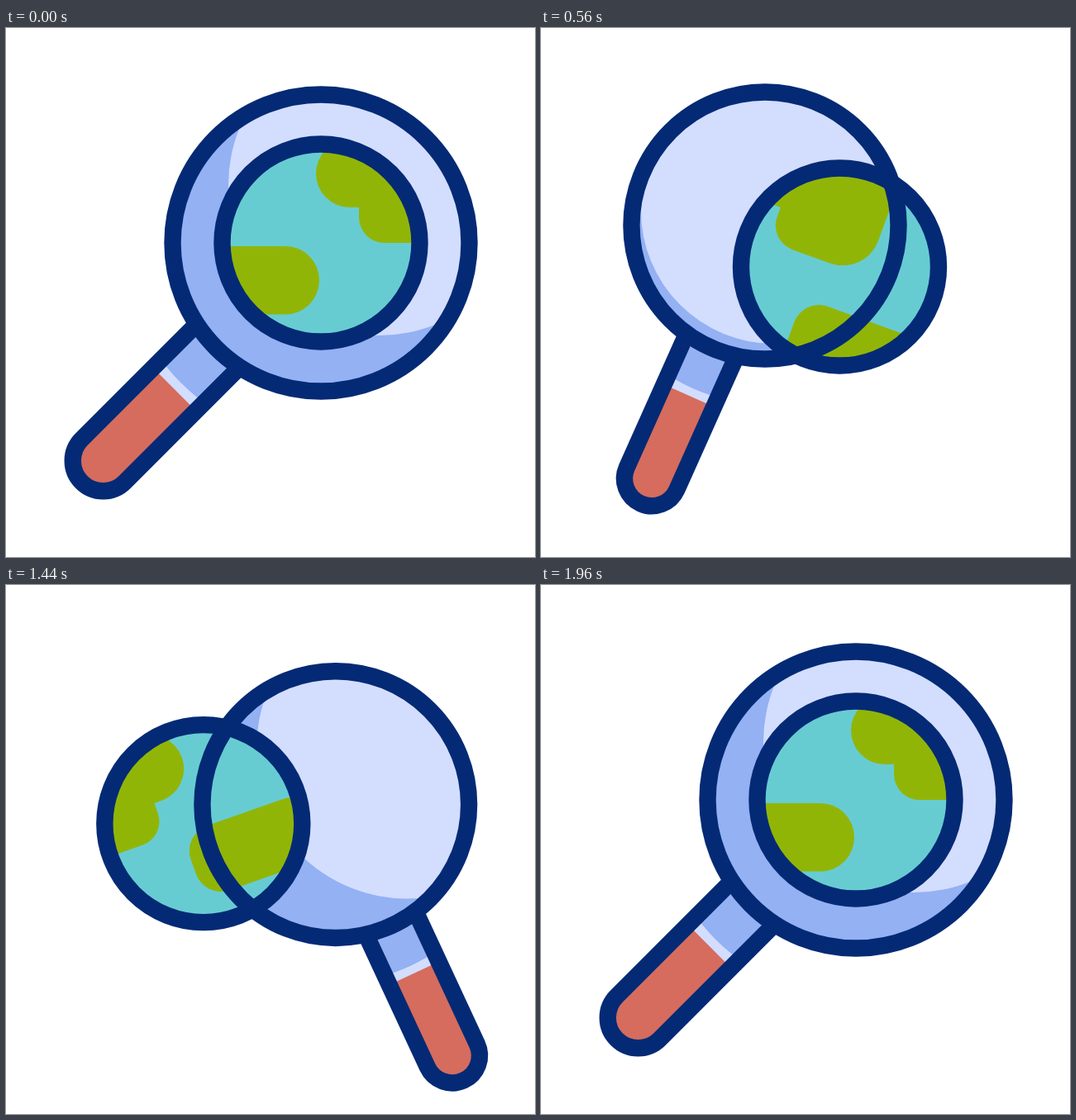
These frames come from a looping animation (640 px wide and 640 px high, 2000 ms). An HTML page with a canvas:

```html
<!DOCTYPE html>
<html lang="en">
<head>
<meta charset="utf-8">
<title>Magnifier and globe</title>
<style>
  html, body { margin: 0; width: 100%; height: 100%; overflow: hidden; background: #fff; }
  canvas { display: block; width: 100vmin; height: 100vmin; }
</style>
</head>
<body>
<canvas id="stage" width="640" height="640"></canvas>
<script>
const ctx = document.getElementById('stage').getContext('2d');
const LOOP = 2000, STEP = 40;
const NAVY = '#042a75', LIGHT = '#d3ddfe', BLUE = '#93b1f3';
const TEAL = '#67ccd2', GREEN = '#91b507', RED = '#d56c5e';

// Cubic Bézier easing, solved by bisection.
function bezier(x1, y1, x2, y2) {
  const at = (a, b, s) => 3 * a * s * (1 - s) ** 2 + 3 * b * s * s * (1 - s) + s ** 3;
  return u => {
    if (u <= 0) return 0;
    if (u >= 1) return 1;
    let lo = 0, hi = 1;
    for (let i = 0; i < 30; i++) {
      const mid = (lo + hi) / 2;
      if (at(x1, x2, mid) < u) lo = mid; else hi = mid;
    }
    return at(y1, y2, lo);
  };
}

const soft = bezier(0.5, 0, 0.5, 1);
const swing = bezier(0.4, 0, 0.4, 1);
const phases = [
  { start: 12, end: 552, globe: soft, glass: soft },
  { start: 720, end: 1240, globe: swing, glass: swing },
  { start: 1400, end: 1960, globe: bezier(0.38, 0, 0.4, 1), glass: bezier(0.25, 0.1, 0.5, 1) }
];

// Three resting values per property; bend curves the way to the next one.
const track = (values, bend = [0, 0, 0]) => ({ values, bend });
const globeTracks = {
  x: track([381, 361.5, 237]),
  y: track([260, 289, 289]),
  turn: track([0, 20, -19.7]),
  pan: track([0, -138, 143])
};
const glassTracks = {
  x: track([381, 271, 401], [-2, 11, -27]),
  y: track([260, 239, 268], [-17, -36, -43.5]),
  turn: track([45, 24.1, -28.5], [0, 27, 0]),
  scale: track([1, 0.9, 0.9], [0, 0, -0.13]),
  paneX: track([381, 271, 401], [-2, 11, 15]),
  paneY: track([260, 239, 268], [-17, -36, -88]),
  shineX: track([70, 11, 86], [0, 0, 22]),
  shineY: track([-70, -18, -70], [0, 0, 40]),
  shineR: track([182, 161, 182])
};

function pose(tracks, phase, p) {
  const result = {};
  for (const [name, { values, bend }] of Object.entries(tracks)) {
    const from = values[phase], to = values[(phase + 1) % 3];
    result[name] = from + (to - from) * p + bend[phase] * p * (1 - p);
  }
  return result;
}

function disc(x, y, r) {
  ctx.beginPath();
  ctx.arc(x, y, r, 0, Math.PI * 2);
}

function fill(color) {
  ctx.fillStyle = color;
  ctx.fill();
}

function outline() {
  ctx.strokeStyle = NAVY;
  ctx.lineWidth = 20.4;
  ctx.stroke();
}

function isolated(draw) {
  ctx.save();
  draw();
  ctx.restore();
}

function land(left, top, right, bottom, radii) {
  ctx.beginPath();
  ctx.roundRect(left, top, right - left, bottom - top, radii);
  fill(GREEN);
}

function drawGlobe({ x, y, turn, pan }) {
  isolated(() => {
    ctx.translate(x, y);
    disc(0, 0, 119.5);
    fill(TEAL);
    isolated(() => {
      ctx.clip();
      ctx.rotate(turn * Math.PI / 180);
      ctx.translate(pan, 0);
      land(-6, -125, 150, -43, [41, 0, 0, 41]);
      land(46, -125, 171, 0, [0, 0, 46, 31]);
      land(-330, -125, -139, -43, [0, 41, 41, 0]);
      land(-330, -60, -189, 0, [0, 0, 30, 0]);
      land(-170, 4, -2, 86.5, [32, 41, 41, 32]);
      land(109, 50, 330, 140, [32, 0, 0, 0]);
    });
    disc(0, 0, 119.5);
    outline();
  });
}

function drawHandle({ x, y, turn, scale }) {
  const half = 36.8 * scale, end = 372.6 * scale;
  const shape = () => {
    ctx.beginPath();
    ctx.roundRect(-half, 0, half * 2, end + half, [0, 0, half, half]);
  };
  isolated(() => {
    ctx.translate(x, y);
    ctx.rotate(turn * Math.PI / 180);
    isolated(() => {
      shape();
      ctx.clip();
      fill(LIGHT);
      disc(0, 0, 239.5 * scale);
      fill(BLUE);
      ctx.fillStyle = RED;
      ctx.fillRect(-half, 250.5 * scale, half * 2, end);
    });
    shape();
    outline();
  });
}

function drawPane({ x, y, scale, paneX, paneY, shineX, shineY, shineR }) {
  disc(x, y, 179.5 * scale);
  fill(BLUE);
  isolated(() => {
    disc(paneX, paneY, 179.5 * scale);
    ctx.clip();
    disc(x + shineX, y + shineY, shineR);
    fill(LIGHT);
  });
}

function draw(time) {
  const t = Math.floor(time % LOOP / STEP) * STEP;
  const index = t < 700 ? 0 : t < 1380 ? 1 : 2;
  const phase = phases[index];
  const u = (t - phase.start) / (phase.end - phase.start);
  const glass = pose(glassTracks, index, phase.glass(u));

  ctx.fillStyle = '#fff';
  ctx.fillRect(0, 0, 640, 640);
  drawHandle(glass);
  drawPane(glass);
  drawGlobe(pose(globeTracks, index, phase.globe(u)));
  disc(glass.x, glass.y, 179.5 * glass.scale);
  outline();
}

function loop() {
  draw(performance.now());
  requestAnimationFrame(loop);
}
loop();
</script>
</body>
</html>
```
